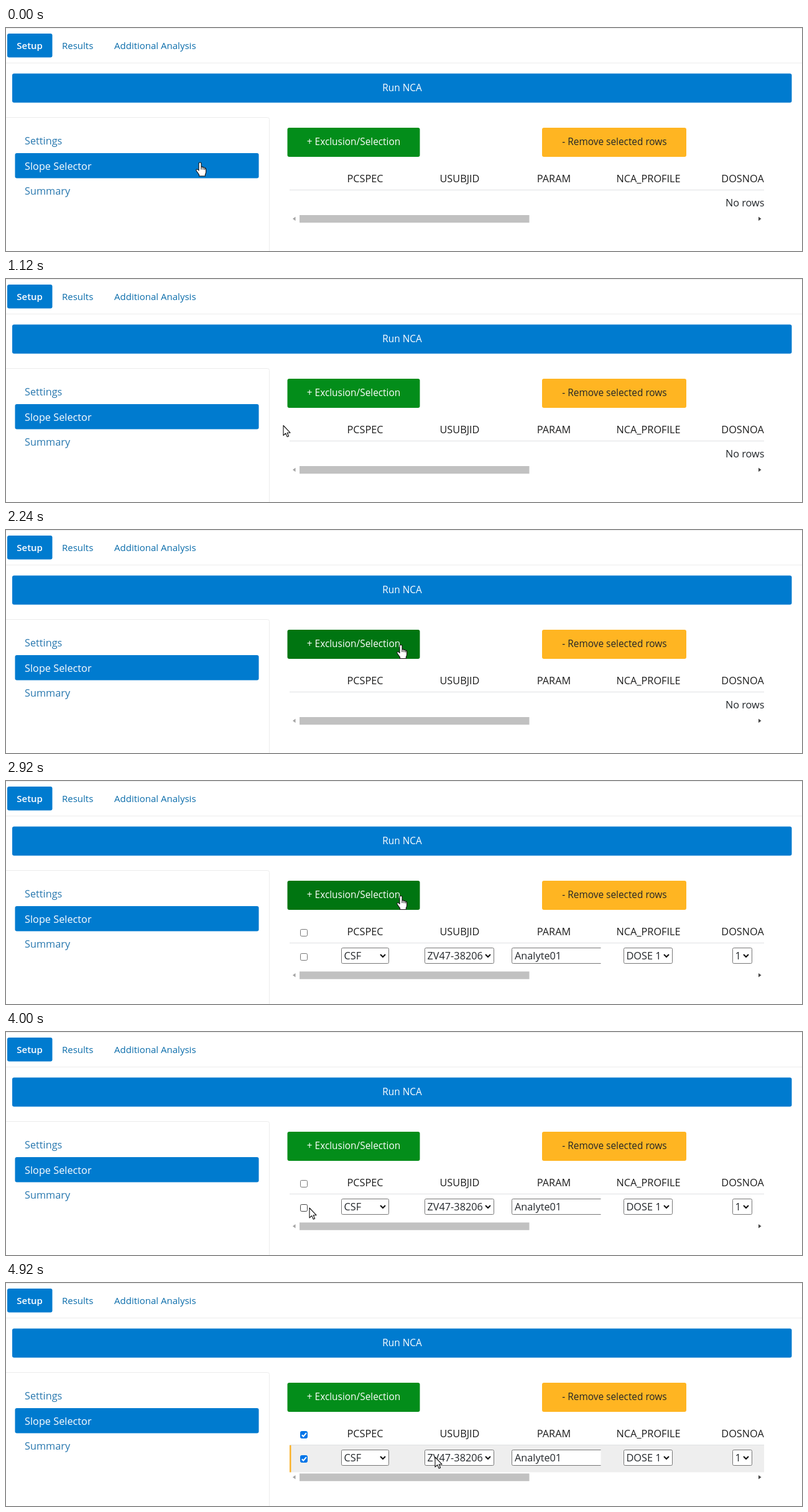
Write an HTML page that moves like this. It is 1280 px wide and 360 px high and loops after 4960 ms.

```html
<!DOCTYPE html>
<html lang="en">
<head>
<meta charset="utf-8">
<title>Slope selector</title>
<style>
  html, body { margin: 0; width: 100%; height: 100%; overflow: hidden; background: #fff; }
  svg { display: block; width: 1280px; height: 360px; }
  text { font-family: "Open Sans", "Noto Sans", sans-serif; font-size: 16.3px; fill: #212529; white-space: pre; }
  .nav { font-size: 15px; font-weight: 500; fill: #0b6dab; }
  .active { font-weight: 600; fill: #fff; }
  .button { font-size: 15.4px; font-weight: 500; text-anchor: middle; }
  .head { font-weight: 500; text-anchor: middle; fill: #1c1c1c; }
  .side { fill: #2777ae; }
  .light { fill: #fff; }
  .blue { fill: #007bcf; }
  .rule { fill: none; stroke: #ececec; }
  .field { fill: #fff; stroke: #767676; }
  .chevron { fill: none; stroke: #111; stroke-width: 2; }
  .box { fill: #fff; stroke: #767676; }
  .box.hover { stroke: #444; }
  .checked .box { fill: #0075e8; stroke: #0075e8; }
  .tick { fill: none; stroke: #fff; stroke-width: 2; visibility: hidden; }
  .checked .tick { visibility: inherit; }
  .cursor { fill: #fff; stroke: #111; stroke-width: 1.1; stroke-linejoin: round; }
</style>
</head>
<body>
<svg viewBox="0 0 1280 360">
  <path class="rule" d="M0 .5H1280M0 56.5H1280M0 144.5H420.5Q423.5 144.5 423.5 147.5V360"/>

  <rect class="blue" x="2" y="9" width="72.5" height="38.5" rx="3"/>
  <text class="nav active" x="17.3" y="34">Setup</text>
  <text class="nav" x="90" y="34">Results</text>
  <text class="nav" x="174" y="34">Additional Analysis</text>

  <rect class="blue" x="10" y="73.5" width="1253.5" height="47" rx="3"/>
  <text class="button light" x="637" y="102">Run NCA</text>

  <rect class="blue" x="14.5" y="202" width="392" height="40.5" rx="3"/>
  <text class="side" x="30" y="188">Settings</text>
  <text class="light" x="30" y="228.5">Slope Selector</text>
  <text class="side" x="30" y="269">Summary</text>

  <rect id="add" x="452.5" y="161" width="213" height="47" rx="3"/>
  <text class="button light" x="559" y="189">+ Exclusion/Selection</text>
  <rect x="862" y="161" width="232" height="47" rx="3" fill="#ffb522"/>
  <text class="button" x="978.5" y="189">- Remove selected rows</text>

  <g id="highlight">
    <rect x="456" y="261" width="763" height="44.5" fill="#eee"/>
    <rect x="456" y="261" width="2.5" height="44.5" fill="#fbb32b"/>
  </g>
  <path d="M456 261.5H1219" stroke="#dfe1e3"/>
  <g id="heads"></g>
  <text id="empty" x="1219.5" y="287.5" text-anchor="end">No rows</text>
  <g id="row"></g>

  <g id="scrollbar">
    <rect x="472" y="302" width="369.5" height="12.3" fill="#c1c1c1"/>
    <path d="M465.5 304.8V311.2L461 308Z" fill="#a3a3a3"/>
    <path d="M1210 304.8V311.2L1214.5 308Z" fill="#484848"/>
  </g>

  <path id="arrow" class="cursor" d="M0 0V16L3.7 12.6L6.2 18.3L8.6 17.2L6.2 11.7H11Z"/>
  <path id="hand" class="cursor" d="M-2 1.5Q-2-.5 0-.5T2 1.5V7Q3.6 6 5 7.5Q6.7 6.8 7.6 8.5Q9.6 8 9.6 11V15Q9.6 17 8.3 19V21.5H-1.5V19.3L-5.6 13.5Q-7 11-5 10.5Q-4 10.3-2 12.5ZM2 7V11M5 7.5V11.3M7.6 8.5V11.6"/>
</svg>
<script>
const LOOP = 4960, STEP = 40;
const ROW_ADDED = 2600, ROW_CHECKED = 4280;

// Pointer tip: time, x, y
const path = [
  [0, 312, 217.5], [400, 312, 217.5], [1120, 446, 236.5], [1760, 635, 186],
  [3080, 635, 186], [3480, 569, 232], [4000, 488, 284], [4120, 482, 284],
  [4480, 482, 284], [4920, 690, 281]
];

const $ = id => document.getElementById(id);
const show = (id, on) => $(id).setAttribute('visibility', on ? 'visible' : 'hidden');
const place = (id, x, y) => $(id).setAttribute('transform', `translate(${x} ${y})`);

const checkbox = (y, id) => `
  <rect id="${id}" class="box" x="473.5" y="${y}" width="11" height="11" rx="2"/>
  <path class="tick" d="M475.8 ${y + 5.7}l2.4 2.5 4.8-5.6"/>`;

const select = (x, right, label) => `
  <rect class="field" x="${x + .5}" y="269.5" width="${right - x - 1}" height="25" rx="2"/>
  <text x="${x + 4.5}" y="288">${label}</text>
  <path class="chevron" d="M${right - 14} 280l4 4 4-4"/>`;

const heads = [['PCSPEC', 577.5], ['USUBJID', 729.5], ['PARAM', 881], ['NCA_PROFILE', 1033], ['DOSNOA', 1184.5]];
$('heads').innerHTML = heads
  .map(([label, x]) => `<text class="head" x="${x}" y="249">${label}</text>`).join('');

$('row').innerHTML =
  checkbox(239.5, 'checkAll') + checkbox(278.5, 'checkRow') +
  select(539, 616, 'CSF') +
  select(673, 785, 'ZV47-38206') +
  `<path class="field" d="M956.5 269.5H815.5Q813.5 269.5 813.5 271.5V292.5Q813.5 294.5 815.5 294.5H956.5"/>
   <text x="818" y="288">Analyte01</text>` +
  select(993, 1072, 'DOSE 1') + select(1168, 1200, '1');

function pointerAt(t) {
  const next = path.findIndex(key => key[0] > t);
  if (next < 0) return path.at(-1).slice(1);
  const [t0, x0, y0] = path[next - 1], [t1, x1, y1] = path[next];
  const u = (t - t0) / (t1 - t0), ease = u * u * (3 - 2 * u);
  return [x0 + (x1 - x0) * ease, y0 + (y1 - y0) * ease];
}

function draw(t) {
  const [x, y] = pointerAt(t);
  const within = (left, top, right, bottom) => x >= left && x <= right && y >= top && y <= bottom;
  const overAdd = within(452, 161, 666, 208);
  const overLink = within(14, 202, 407, 243);
  const overHead = within(519, 225, 1219, 261);
  const pointing = overAdd || overLink || overHead;
  const added = t >= ROW_ADDED, checked = t >= ROW_CHECKED;

  $('add').setAttribute('fill', overAdd ? '#007511' : '#038d1a');
  show('empty', !added);
  show('row', added);
  show('highlight', checked);
  $('row').classList.toggle('checked', checked);
  $('checkRow').classList.toggle('hover', within(470, 274, 492, 294));
  place('scrollbar', 0, added ? 5.5 : 0);
  show('hand', pointing);
  show('arrow', !pointing);
  place('hand', x, y);
  place('arrow', x, y);
}

const start = performance.now();
function tick() {
  const t = (performance.now() - start) % LOOP;
  draw(Math.floor(t / STEP) * STEP);
  requestAnimationFrame(tick);
}
draw(0);
requestAnimationFrame(tick);
</script>
</body>
</html>
```
